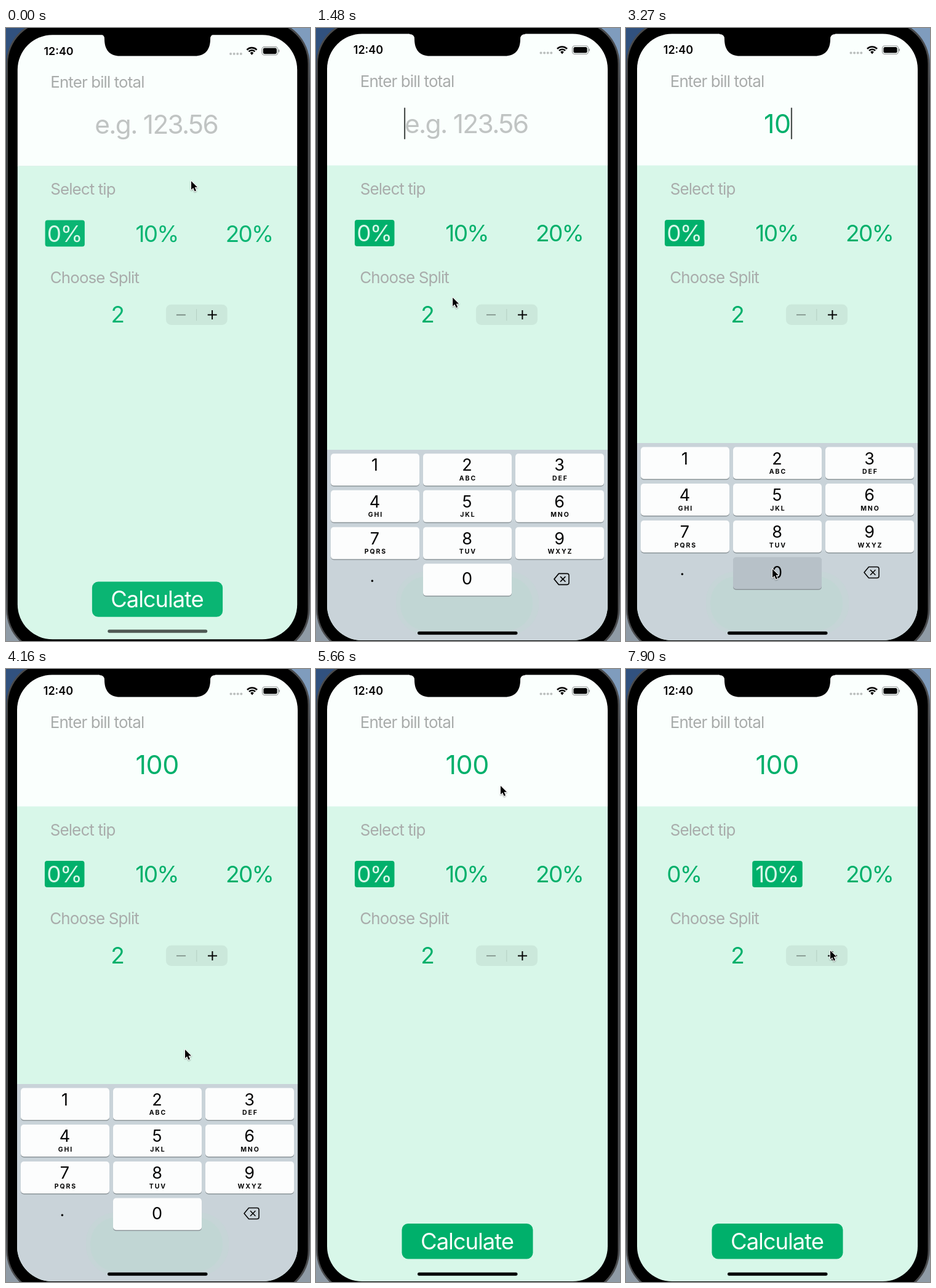
Animation of 494x997 px, one loop 8 s. Source, as an HTML page with a canvas:

```html
<!DOCTYPE html>
<html lang="en">
<head>
<meta charset="utf-8">
<title>Tip calculator</title>
<style>
html, body { margin: 0; width: 100%; height: 100%; overflow: hidden; background: #000; }
canvas { display: block; width: 494px; height: 997px; }
</style>
</head>
<body>
<canvas id="stage"></canvas>
<script>
const W = 494, H = 997, LOOP = 8000, STEP = 148.9;
const GREEN = '#00b06b', MINT = '#d8f7e9', LABEL = '#a9acab', INK = '#050505';
const FONT = 'Inter, Roboto, "Liberation Sans", sans-serif';
const KB_TOP = 675, KB_HEIGHT = 322, KB_OPEN = 1060, KB_CLOSE = 4320;
const KEY_X = [24, 174, 324], KEY_Y = [6.5, 66, 126, 185.5];
const LETTERS = ['', 'ABC', 'DEF', 'GHI', 'JKL', 'MNO', 'PQRS', 'TUV', 'WXYZ'];
const TYPED = [[2370, '1'], [3270, '0'], [3570, '0']];
const TAP = 6550;

// time, x, y of the pointer tip
const POINTER = [
  [0, 301, 249], [450, 301, 249], [600, 297, 240], [1040, 258, 167], [1200, 258, 167],
  [1340, 252, 215], [1490, 222, 440], [1640, 188, 640], [1790, 165, 690], [2080, 153, 701],
  [2530, 153, 701], [2680, 158, 718], [3130, 238, 880], [3720, 238, 880], [4160, 291, 619],
  [4760, 291, 619], [5360, 295, 199], [5510, 298, 188], [5660, 300, 190], [6200, 261, 347],
  [6400, 260, 342], [6850, 260, 342], [7450, 268, 828], [7600, 288, 705], [7880, 332, 458]
];

const canvas = document.getElementById('stage');
const ctx = canvas.getContext('2d');
const ratio = window.devicePixelRatio || 1;
canvas.width = W * ratio;
canvas.height = H * ratio;

const clamp = v => Math.max(0, Math.min(1, v));
const settle = ms => ms <= 0 ? 0 : 1 - Math.exp(-ms * 0.0079);

function box(x, y, w, h, r, color) {
  ctx.beginPath();
  ctx.roundRect(x, y, w, h, r);
  ctx.fillStyle = color;
  ctx.fill();
}

function text(str, x, y, size, color, spacing = 0, weight = 400) {
  ctx.font = `${weight} ${size}px ${FONT}`;
  ctx.letterSpacing = spacing * size + 'px';
  ctx.textAlign = 'center';
  ctx.fillStyle = color;
  ctx.fillText(str, x + spacing * size / 2, y);
}

function line(color, width, ...points) {
  ctx.beginPath();
  points.forEach(([x, y], i) => i ? ctx.lineTo(x, y) : ctx.moveTo(x, y));
  ctx.strokeStyle = color;
  ctx.lineWidth = width;
  ctx.stroke();
}

function pointerAt(t) {
  const i = POINTER.findIndex(p => p[0] > t);
  if (i < 0) return POINTER[POINTER.length - 1].slice(1);
  const [t0, x0, y0] = POINTER[i - 1], [t1, x1, y1] = POINTER[i];
  const k = (t - t0) / (t1 - t0);
  return [x0 + (x1 - x0) * k, y0 + (y1 - y0) * k];
}

function wall(x, w, top, bottom) {
  const paint = ctx.createLinearGradient(0, 0, 0, H);
  paint.addColorStop(0, top);
  paint.addColorStop(0.04, top);
  paint.addColorStop(0.1, '#1d2024');
  paint.addColorStop(0.9, '#1d2024');
  paint.addColorStop(0.96, bottom);
  paint.addColorStop(1, bottom);
  ctx.fillStyle = paint;
  ctx.fillRect(x, 0, w, H);
}

function drawBody() {
  wall(0, W / 2, '#31517e', '#8f9ba6');
  wall(W / 2, W / 2, '#7f9cbd', '#8f9ba6');
  box(0.5, -13, 493, 1030, 71, '#4a4b4d');
  box(3, -10, 487.5, 1024, 68, '#000');
}

function drawNotch() {
  ctx.beginPath();
  ctx.moveTo(152, 8);
  ctx.lineTo(152, 10);
  ctx.quadraticCurveTo(160, 10, 160, 18);
  ctx.bezierCurveTo(160, 36, 169, 45.5, 185, 45.5);
  ctx.lineTo(307, 45.5);
  ctx.bezierCurveTo(323, 45.5, 332, 36, 332, 18);
  ctx.quadraticCurveTo(332, 10, 340, 10);
  ctx.lineTo(340, 8);
  ctx.fillStyle = '#000';
  ctx.fill();
}

function drawStatus() {
  text('12:40', 85, 42, 18, INK, 0, 600);
  for (let i = 0; i < 4; i++) box(363.5 + i * 5.6, 38.5, 4, 4, 2, '#bbbfbe');
  ctx.strokeStyle = INK;
  ctx.lineWidth = 2.6;
  for (const r of [11, 6.8]) {
    ctx.beginPath();
    ctx.arc(400, 41.5, r, -Math.PI * 0.76, -Math.PI * 0.24);
    ctx.stroke();
  }
  ctx.beginPath();
  ctx.moveTo(400, 42.5);
  ctx.arc(400, 41.5, 3.8, -Math.PI * 0.76, -Math.PI * 0.24);
  ctx.fillStyle = INK;
  ctx.fill();
  ctx.beginPath();
  ctx.roundRect(416.5, 29, 26, 13.5, 4);
  ctx.strokeStyle = '#8f9493';
  ctx.lineWidth = 1.1;
  ctx.stroke();
  box(418.4, 30.9, 22.2, 9.7, 2.5, INK);
  box(443.4, 33.5, 1.6, 4.5, 1, '#8f9493');
}

function drawTip(label, x, w, green, fill, color, alpha = 1) {
  ctx.globalAlpha = fill;
  if (fill) box(x - w / 2, 312, w, 43, 4, green);
  ctx.globalAlpha = alpha;
  text(label, x, 347, 37, color, -0.045);
  ctx.globalAlpha = 1;
}

function drawTips(t, green) {
  const chosen = t > TAP + 50;
  const fade = clamp(1 - (t - TAP) / 190);
  const glow = t < TAP ? 1 : clamp(0.3 + (t - TAP) / 600);
  drawTip('0%', 95.2, 64.5, green, fade, chosen ? green : MINT);
  drawTip('10%', 246, 81.5, green, chosen ? 1 : 0, chosen ? MINT : green, glow);
  drawTip('20%', 396.5, 81.5, green, 0, green);
}

function drawStepper(green) {
  text('2', 181.5, 478.5, 37, green);
  box(260, 449.5, 100, 33.5, 8.5, '#cbe8db');
  line('#75857e', 1.6, [277, 466.5], [292, 466.5]);
  line('#b4cfc3', 1, [309.8, 457], [309.8, 476]);
  line(INK, 2, [328, 466.5], [343, 466.5]);
  line(INK, 2, [335.4, 459], [335.4, 474]);
}

function drawAmount(t) {
  const done = TYPED.filter(k => k[0] <= t + 10);
  const value = done.map(k => k[1]).join('');
  let caretX = 144;
  if (value) {
    text(value, 246, 171, 43, GREEN, -0.01);
    caretX = 246 + ctx.measureText(value).width / 2 + 1;
  } else {
    text('e.g. 123.56', 245, 171, 42.5, '#c0c4c3', -0.04);
  }
  const since = t - (done.length ? done[done.length - 1][0] : 1040);
  if (since >= 0 && t < KB_CLOSE && since % 1000 < 560) {
    box(caretX - 1, 129.5, 2.2, 51.5, 1, '#4b504e');
  }
}

function drawKey(x, y, digit, letters, down) {
  box(x, y + 1.4, 144, 52, 5, '#8c9599');
  box(x, y, 144, 52, 5, down ? '#b7c1c8' : '#fcfdfd');
  text(digit, x + 71.5, y + (digit === '0' ? 34 : 28), 27, INK);
  if (letters) text(letters, x + 72, y + 43.5, 10.5, INK, 0.18, 700);
}

function drawKeyboard(t) {
  const up = settle(t - KB_OPEN) - settle(t - KB_CLOSE);
  if (up <= 0) return;
  const top = KB_TOP + KB_HEIGHT * (1 - up);
  const pressed = TYPED.find(k => Math.abs(t - k[0] - 20) < 60);
  const isDown = d => Boolean(pressed) && pressed[1] === d;

  ctx.save();
  ctx.beginPath();
  ctx.rect(0, top, W, H);
  ctx.clip();
  ctx.fillStyle = '#c9d3d9';
  ctx.fillRect(0, top, W, KB_HEIGHT + 10);
  box(130, 884, 232, 102, 48, 'rgba(190, 215, 210, 0.3)');
  box(137, 892, 215, 88, 42, 'rgba(190, 215, 210, 0.5)');
  LETTERS.forEach((letters, i) => {
    const digit = String(i + 1);
    drawKey(KEY_X[i % 3], top + KEY_Y[Math.floor(i / 3)], digit, letters, isDown(digit));
  });
  drawKey(KEY_X[1], top + KEY_Y[3], '0', '', isDown('0'));
  text('.', 91.5, top + 215, 27, INK);

  const y = top + 210.5;
  ctx.lineJoin = 'round';
  ctx.beginPath();
  ctx.moveTo(387, y);
  ctx.lineTo(394.5, y - 9);
  ctx.arcTo(411, y - 9, 411, y, 3);
  ctx.arcTo(411, y + 9, 395, y + 9, 3);
  ctx.lineTo(394.5, y + 9);
  ctx.closePath();
  ctx.strokeStyle = INK;
  ctx.lineWidth = 1.6;
  ctx.stroke();
  line(INK, 1.6, [397, y - 4.2], [405.4, y + 4.2]);
  line(INK, 1.6, [405.4, y - 4.2], [397, y + 4.2]);
  ctx.restore();
}

function drawScreen(t) {
  const grow = clamp(t / (2 * STEP));
  const scale = 0.9965 + 0.0035 * grow;
  const green = grow < 1 ? '#0ab573' : GREEN;
  ctx.save();
  ctx.translate(246, 490);
  ctx.scale(scale, scale);
  ctx.translate(-246, -490);
  ctx.beginPath();
  ctx.roundRect(18, 9.5, 456, 986.5, 57);
  ctx.clip();

  ctx.fillStyle = '#fafffd';
  ctx.fillRect(0, 0, W, 224);
  ctx.fillStyle = MINT;
  ctx.fillRect(0, 223.5, W, H);
  drawStatus();
  text('Enter bill total', 148.5, 96, 26, LABEL, -0.034);
  drawAmount(t);
  text('Select tip', 125, 270.5, 26, LABEL, -0.034);
  drawTips(t, green);
  text('Choose Split', 144, 415, 26, LABEL, -0.034);
  drawStepper(green);
  box(139.5, 902, 213, 57.5, 10, green);
  text('Calculate', 246, 944, 36.5, '#f8fffb', -0.03);
  drawKeyboard(t);

  // the home bar darkens once the keyboard is up
  const dark = 0.64 + 0.36 * clamp((t - 1200) / 300);
  box(165, 981.5 - 1.3 * (1 - grow), 162.5, 5.2, 2.6, `rgba(0, 0, 0, ${dark})`);
  ctx.restore();
}

function drawPointer(t) {
  const [x, y] = pointerAt(t);
  ctx.save();
  ctx.translate(x, y);
  ctx.beginPath();
  ctx.moveTo(0, 0);
  [[0, 14], [3.2, 11], [5.6, 16.6], [8, 15.6], [5.6, 10.1], [10, 10.1]].forEach(p => ctx.lineTo(...p));
  ctx.closePath();
  ctx.lineJoin = 'round';
  ctx.shadowColor = 'rgba(0, 0, 0, 0.35)';
  ctx.shadowBlur = 2 * ratio;
  ctx.shadowOffsetY = ratio;
  ctx.strokeStyle = '#fff';
  ctx.lineWidth = 2;
  ctx.stroke();
  ctx.shadowColor = 'transparent';
  ctx.fillStyle = '#000';
  ctx.fill();
  ctx.restore();
}

function draw(ms) {
  const t = Math.floor((ms % LOOP + 20) / STEP) * STEP;
  ctx.setTransform(ratio, 0, 0, ratio, 0, 0);
  drawBody();
  drawScreen(t);
  drawNotch();
  drawPointer(t);
}

let start = null;
function tick() {
  const now = performance.now();
  if (start === null) start = now;
  draw(now - start);
  requestAnimationFrame(tick);
}
tick();
</script>
</body>
</html>
```
